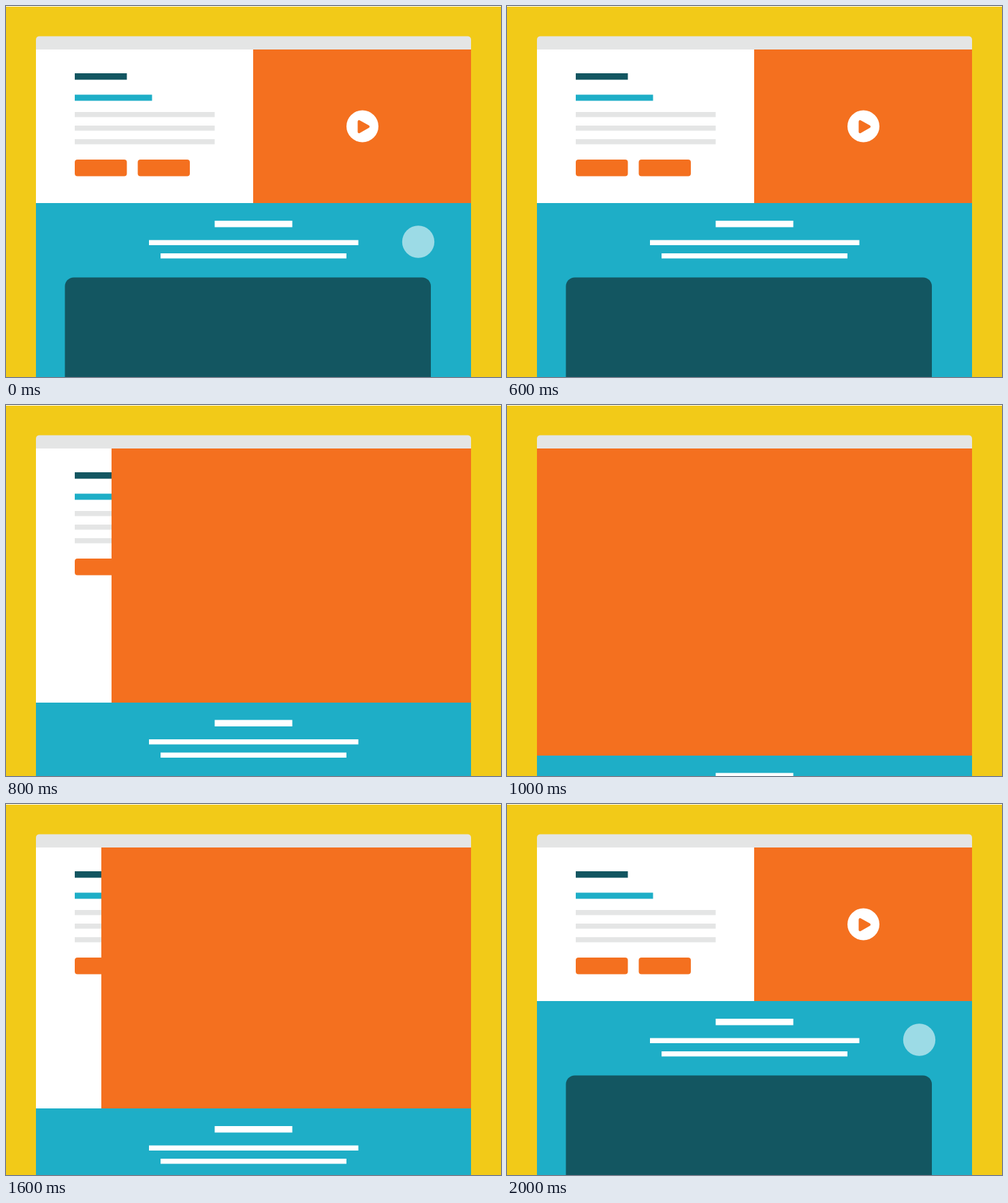
These frames come from a looping animation (727 px wide and 546 px high, 2.4 s). An HTML page with a canvas:

```html
<!DOCTYPE html>
<html lang="en">
<head>
<meta charset="utf-8">
<title>Expanding video panel</title>
<style>
  html, body { margin: 0; width: 100%; height: 100%; overflow: hidden; background: #f2ca18; }
  canvas { display: block; width: 727px; height: 546px; }
</style>
</head>
<body>
<canvas id="stage" width="727" height="546"></canvas>
<script>
const ctx = document.getElementById('stage').getContext('2d');
const W = 727, H = 546, LOOP = 2400, STEP = 100;
const YELLOW = '#f2ca18', GREY = '#e4e5e5', TEAL = '#1eaec7',
      DARK = '#135661', ORANGE = '#f4701f', WHITE = '#ffffff';

const page = { left: 44, right: 683, top: 64 };
const panel = { left: 363.4, bottom: 290.3, drop: 225.5 };
const play = { x: 523.5, y: 177, r: 23.5 };
const rest = { x: 605.5, y: 347 };

const mix = (a, b, p) => a + (b - a) * p;
const span = (t, from, to) => Math.min(1, Math.max(0, (t - from) / (to - from)));

const easeInOut = t => t < 0.5 ? 4 * t ** 3 : 1 - 4 * (1 - t) ** 3;
const easeOut = t => 1 - (1 - t) ** 1.53;
const easeIn = t => t * t * (0.514 + 2.242 * t - 1.756 * t * t);

function box(color, x1, y1, x2, y2, radius = 0) {
  ctx.fillStyle = color;
  ctx.beginPath();
  ctx.roundRect(x1, y1, x2 - x1, y2 - y1, radius);
  ctx.fill();
}

function disc(color, x, y, r) {
  ctx.fillStyle = color;
  ctx.beginPath();
  ctx.arc(x, y, r, 0, Math.PI * 2);
  ctx.fill();
}

function drawCopy() {
  box(WHITE, page.left, page.top, page.right, H);
  box(DARK, 101, 99, 177.5, 108.5);
  box(TEAL, 101, 130.5, 214.5, 139.5);
  for (let i = 0; i < 3; i++) box(GREY, 101, 156 + i * 20, 306.5, 163.5 + i * 20);
  for (const x of [101, 193.5]) box(ORANGE, x, 226, x + 76.5, 250.5, 4);
}

function drawLower(shift) {
  ctx.save();
  ctx.translate(0, shift);
  box(WHITE, 306.5, 316, 420.5, 325.5);
  box(WHITE, 210, 344.5, 517.5, 352);
  box(WHITE, 227, 364, 500, 371.5);
  box(DARK, 86.5, 399.5, 624, 600, 13);
  ctx.restore();
}

function drawPlay() {
  disc(WHITE, play.x, play.y, play.r);
  ctx.fillStyle = ctx.strokeStyle = ORANGE;
  ctx.lineWidth = 4;
  ctx.lineJoin = 'round';
  ctx.beginPath();
  ctx.moveTo(518.5, 170);
  ctx.lineTo(532, 177.6);
  ctx.lineTo(518.5, 185.2);
  ctx.closePath();
  ctx.fill();
  ctx.stroke();
}

function drawCursor(t) {
  const p = t < 600 ? easeInOut(t / 600) : 0;
  disc('rgba(255,255,255,0.56)', mix(rest.x, play.x, p), mix(rest.y, play.y, p), 23.7);
}

function draw(t) {
  const open = easeOut(span(t, 600, 1000)) - easeIn(span(t, 1300, 1900));
  const shift = panel.drop * open;
  // Whole pixels keep the panel's edges crisp.
  const left = Math.round(mix(panel.left, page.left, open));
  const bottom = Math.round(panel.bottom + shift);

  box(YELLOW, 0, 0, W, H);
  box(WHITE, 0, 0, W, 1);
  drawCopy();
  box(TEAL, page.left, bottom, page.right, H);
  drawLower(shift);
  box(ORANGE, left, page.top, page.right, bottom);
  box(GREY, page.left, 44.4, page.right, page.top, [5, 5, 0, 0]);
  if (t < 700 || t >= 1900) drawPlay();
  if (t < 600 || t >= 2000) drawCursor(t);
}

// The motion advances in even steps rather than continuously.
const start = performance.now();
function tick() {
  const t = (performance.now() - start) % LOOP;
  draw(Math.floor(t / STEP) * STEP);
  requestAnimationFrame(tick);
}
tick();
</script>
</body>
</html>
```
